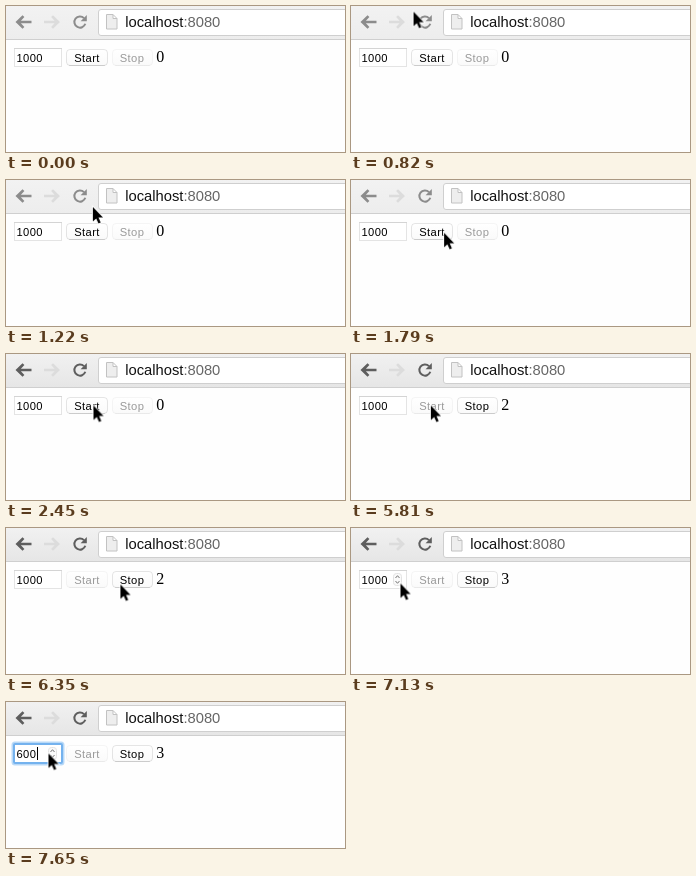
An HTML page that plays this animation: 339 by 146 pixels, repeating every 8 s.

```html
<!DOCTYPE html>
<html lang="en">
<head>
<meta charset="utf-8">
<title>Counter</title>
<style>
  html, body { margin: 0; width: 100%; height: 100%; overflow: hidden; background: #fefefe; }
  svg { display: block; width: 339px; height: 146px; }
  text { font: 11.2px "Liberation Sans", Arial, sans-serif; letter-spacing: .4px; fill: currentColor; }
  .url { font-size: 14.75px; letter-spacing: 0; }
  .count text { font: 16px "Liberation Serif", Times, serif; letter-spacing: 0; }
  .label { text-anchor: middle; }

  /* 1% = 80ms; states jump, the pointer glides */
  .anim { animation: 8s step-end infinite; }
  .icons { color: #8c8c8c; animation-name: wake; animation-timing-function: linear; }
  .shade { opacity: 0; animation-name: shade; animation-timing-function: linear; }
  .start { animation-name: start; }
  .stop { animation-name: stop; }
  .face { fill: url(#face); stroke: currentColor; stroke-opacity: .1; }
  .edge { stroke: currentColor; stroke-opacity: .1; }
  .press { opacity: 0; animation-name: press; }
  .count .anim { animation-name: count; }
  .value .anim { animation-name: value; }
  .ring { opacity: 0; animation-name: ring; }
  .spin { opacity: 0; animation-name: spin; }
  .pointer { animation-name: move; animation-timing-function: linear; }

  @keyframes wake { 0%, 29% { color: #8c8c8c } 30.5%, 100% { color: #5e5e5e } }
  @keyframes shade { 0%, 29% { opacity: 0 } 30.5%, 100% { opacity: 1 } }
  @keyframes start { 0% { color: #000 } 43.8%, 100% { color: #999 } }
  @keyframes stop { 0% { color: #999 } 43.8%, 100% { color: #000 } }
  @keyframes press { 0% { opacity: 0 } 42.125% { opacity: 1 } 43.8%, 100% { opacity: 0 } }
  @keyframes count {
    0% { transform: none }
    56.25% { transform: translateY(-30px) }
    68.875% { transform: translateY(-60px) }
    80.8%, 100% { transform: translateY(-90px) }
  }
  @keyframes value {
    0% { transform: none }
    91.5% { transform: translateY(-30px) }
    92.9% { transform: translateY(-60px) }
    94.25% { transform: translateY(-90px) }
    95.6%, 100% { transform: translateY(-120px) }
  }
  @keyframes ring { 0% { opacity: 0 } 91.5%, 100% { opacity: 1 } }
  @keyframes spin { 0% { opacity: 0 } 88.9%, 100% { opacity: 1 } }
  @keyframes move {
    0%, 4.86% { transform: translate(190px, 160px) }
    4.875% { transform: translate(175px, 128px) }
    6.25%, 9.625% { transform: translate(61px, 5px) }
    12.5% { transform: translate(68px, 8px) }
    15.25% { transform: translate(86.5px, 26.5px) }
    16%, 19.375% { transform: translate(109px, 54px) }
    22% { transform: translate(94px, 53px) }
    24.75%, 37.75% { transform: translate(87.5px, 51.5px) }
    38.75%, 68.6% { transform: translate(73.5px, 51.5px) }
    69.625%, 72.6% { transform: translate(79.5px, 51.5px) }
    74.5% { transform: translate(97px, 54px) }
    76.875%, 78.375% { transform: translate(112px, 56px) }
    80.875%, 84.875% { transform: translate(118px, 57px) }
    86.625%, 88.125% { transform: translate(58px, 57px) }
    89.125% { transform: translate(49.5px, 55.5px) }
    91%, 100% { transform: translate(42.5px, 51.5px) }
  }
</style>
</head>
<body>
<svg viewBox="0 0 339 146">
  <defs>
    <linearGradient id="bar" x2="0" y2="1"><stop stop-color="#f2f2f2"/><stop offset="1" stop-color="#ededed"/></linearGradient>
    <linearGradient id="barOn" x2="0" y2="1"><stop stop-color="#f1f1f1"/><stop offset="1" stop-color="#e6e6e6"/></linearGradient>
    <linearGradient id="face" x2="0" y2="1"><stop stop-color="#fff"/><stop offset="1" stop-color="#fafafa"/></linearGradient>
    <clipPath id="countBox"><path d="M148 42h14v20h-14z"/></clipPath>
    <clipPath id="valueBox"><path d="M9 43h46v17H9z"/></clipPath>
    <path id="arrow" d="M0 0l7-6.8 1.9 1.9-3.5 3.6H16v2.6H5.400l3.500 3.600L7 6.800z"/>
  </defs>

  <!-- toolbar -->
  <rect width="339" height="33" fill="url(#bar)"/>
  <rect class="anim shade" width="339" height="33" fill="url(#barOn)"/>
  <path d="M0 33.5h339" stroke="#cfcfcf"/>
  <rect x="92.5" y="3.5" width="260" height="26" rx="2.5" fill="#fff" stroke="#cfcfcf"/>
  <g class="anim icons" fill="currentColor">
    <use href="#arrow" x="9.5" y="16"/>
    <path d="M78 12.1A5.6 5.6 0 1 0 79.3 17.8" fill="none" stroke="currentColor" stroke-width="2"/>
    <path d="M80.8 9v6.2h-6.2z"/>
  </g>
  <use href="#arrow" transform="translate(54 16) scale(-1 1)" fill="#dcdcdc"/>
  <path d="M100.5 8.500h6.500l4 4v10.500h-10.500zM107 8.500v4h4" fill="#eee" stroke="#c2c2c2"/>
  <text class="url" x="119.2" y="21" color="#111">localhost<tspan fill="#666">:8080</tspan></text>

  <!-- number field -->
  <rect x="8.5" y="42.5" width="47" height="18" fill="#fff" stroke="#e4e4e4"/>
  <path d="M8 42.5h48" stroke="#d4d4d4"/>
  <g class="anim ring" fill="none">
    <rect x="6.5" y="40.5" width="51" height="22" rx="2.5" stroke="#b9d9f7" stroke-width="2"/>
    <rect x="8" y="42" width="48" height="19" rx="1" stroke="#74b2ee" stroke-width="2"/>
  </g>
  <g class="value" clip-path="url(#valueBox)">
    <g class="anim">
      <text x="10.5" y="56">1000</text>
      <text x="10.5" y="86">900</text>
      <text x="10.5" y="116">800</text>
      <text x="10.5" y="146">700</text>
      <text x="10.5" y="176">600</text>
      <path d="M31.5 75v13m0 17v13m0 17v13m0 17v13" stroke="#000"/>
    </g>
  </g>
  <g class="anim spin" fill="none">
    <rect x="42.5" y="45.5" width="8" height="12" rx="3" fill="#fafafa" stroke="#e2e2e2"/>
    <path d="M44.5 50l2-2.300 2 2.300M44.5 53l2 2.300 2-2.300" stroke="#777"/>
  </g>

  <!-- buttons -->
  <g class="anim start">
    <rect class="face" x="60.5" y="43.5" width="41" height="16" rx="3.5"/>
    <path class="edge" d="M63 59.500h36"/>
    <rect class="anim press" x="61" y="44" width="40" height="15" rx="3" fill="#000" fill-opacity=".12"/>
    <text class="label" x="81" y="56">Start</text>
  </g>
  <g class="anim stop">
    <rect class="face" x="106.5" y="43.5" width="40" height="16" rx="3.5"/>
    <path class="edge" d="M109 59.500h35"/>
    <text class="label" x="126" y="56">Stop</text>
  </g>

  <!-- counter -->
  <g class="count" clip-path="url(#countBox)">
    <g class="anim">
      <text x="150.3" y="56">0</text>
      <text x="150.3" y="86">1</text>
      <text x="150.3" y="116">2</text>
      <text x="150.3" y="146">3</text>
    </g>
  </g>

  <path class="anim pointer" d="M0 0v14.5l3.300-3 2.300 5 2.200-1-2.200-4.900h4.500z" stroke="#fff" stroke-width="1.6" paint-order="stroke"/>
</svg>
</body>
</html>
```
